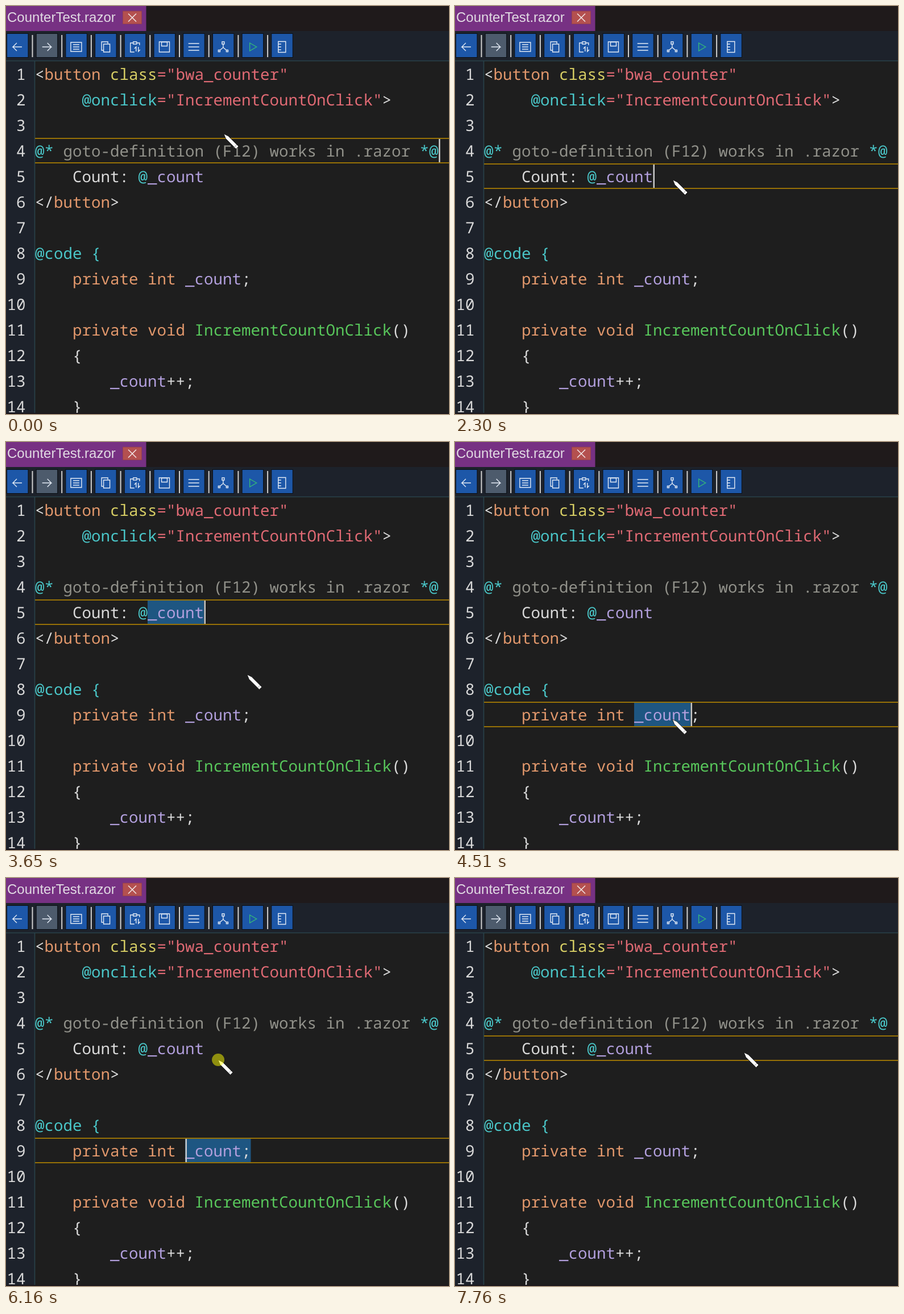
An HTML page for the animation above (8000 ms loop, 779x718 px).

```html
<!DOCTYPE html>
<html lang="en">
<head>
<meta charset="utf-8">
<title>Code editor</title>
<style>
  html, body { margin: 0; width: 100%; height: 100%; overflow: hidden; background: #1e1e1e; }
  svg { display: block; }
  .code { font: 27.5px "Noto Sans Mono", monospace; text-rendering: geometricPrecision; white-space: pre; }
  .tab { font: 24px "Liberation Sans", Arial, sans-serif; fill: #e2dce4; }
  .icon { fill: none; stroke: #e4ebf5; stroke-width: 1.4; }
  .plain { fill: #dadada; }
  .tag { fill: #e2986c; }
  .attr { fill: #d6cd64; }
  .string { fill: #e06a74; }
  .razor { fill: #4ac6c8; }
  .comment { fill: #91918a; }
  .field { fill: #b29fdd; }
  .method { fill: #58c65b; }
</style>
</head>
<body>
<svg width="779" height="718" viewBox="0 0 779 718">
  <rect width="779" height="718" fill="#1e1e1e"/>
  <rect width="779" height="44" fill="#1f1a1b"/>
  <rect width="246.500" height="44" fill="#773183"/>
  <text class="tab" x="2" y="28">CounterTest.razor</text>
  <rect x="205.500" y="9" width="33" height="22.500" fill="#b4504f" stroke="#93404f"/>
  <path d="M215 13.500l14 14m0-14l-14 14" stroke="#f0dfe0" stroke-width="1.700"/>
  <rect y="44" width="779" height="52" fill="#1d222b"/>
  <g id="toolbar"></g>
  <rect y="97" width="50" height="621" fill="#1d222b"/>
  <path d="M0 96.500H779M50.500 97V718" stroke="#28424a" stroke-width="1.600"/>
  <rect id="selection" height="41" fill="#1e5682"/>
  <path id="row" fill="none" stroke="#977106" stroke-width="1.800"/>
  <g id="code" class="code"></g>
  <rect y="716" width="779" height="2" fill="#1c171b"/>
  <rect id="caret" width="2.500" height="41" fill="#c9c9c9"/>
  <g id="pointer">
    <path d="M0 0L3.500 8.500L21.500 26.500L26 22L8 4Z" fill="#fff" stroke="#111" stroke-width=".8"/>
    <path d="M18.500 23.500L23 19" stroke="#777" stroke-width=".8"/>
    <circle id="press" r="11" fill="#ff0" fill-opacity=".5"/>
  </g>
</svg>
<script>
const LOOP = 8000, LEFT = 51, CHAR = 16.5, ROW = 45;
const $ = id => document.getElementById(id);
const columnX = col => LEFT + CHAR * col;
const rowY = line => 97 + ROW * (line - 1);

function set(el, attrs) {
  for (const name in attrs) el.setAttribute(name, attrs[name]);
}
function add(parent, tag, attrs, text = "") {
  const el = document.createElementNS("http://www.w3.org/2000/svg", tag);
  set(el, attrs);
  el.textContent = text;
  parent.append(el);
}

// Icon parts, placed by their centre
const box = (w, h, x = 0, y = 0) => `M${x - w / 2} ${y - h / 2}h${w}v${h}h${-w}Z`;
const rule = (w, x, y) => `M${x - w / 2} ${y}h${w}`;
const arrow = side => `M${-8 * side} 0h${16 * side}l${-7 * side} -7m0 14l${7 * side} -7`;
const rules = (w, x, gap) => [-gap, 0, gap].map(y => rule(w, x, y)).join("");
const icons = [
  arrow(-1),
  arrow(1),
  box(19, 16) + rules(11, 0, 4),
  box(11, 14, 2, 2) + "M-4 6h-3v-15h11v3",
  "M-3 -7h-5v16h7M3 -7h5v4" + box(6, 4, 0, -7) + "M2 8v-8l-3 3M6 0v8l3 -3",
  box(18, 18) + box(10, 7, 0, -5),
  rules(19, 0, 6),
  box(4, 4, 0, -7) + "M0 -5v6l-6 5M0 1l6 5" + box(3, 3, -7, 7) + box(3, 3, 7, 7),
  "M-5 -7l12 7l-12 7Z",
  box(13, 19) + rules(5, -4, 5)
];
icons.forEach((d, i) => {
  const x = 20 + 51.7 * i, bar = $("toolbar"), play = i === 8, disabled = i === 1;
  add(bar, "rect", { x: x - 18.5, y: 48.5, width: 37.5, height: 42, fill: disabled ? "#4d5b6c" : "#1d57a8", stroke: "#0b0f15" });
  add(bar, "path", { class: "icon", d, transform: `translate(${x} 72)`, style: play ? "stroke:#35b779" : "" });
  if (i < icons.length - 1) add(bar, "rect", { x: x + 25.5, y: 51, width: 2, height: 39, fill: "#cfcfcf" });
});

const source = `<button class="bwa_counter"
     @onclick="IncrementCountOnClick">

@* goto-definition (F12) works in .razor *@
    Count: @_count
</button>

@code {
    private int _count;

    private void IncrementCountOnClick()
    {
        _count++;
    }`;
const syntax = new RegExp([
  '(?<string>="[^"]*")',
  "(?<comment>(?<=@\\* ).*(?= \\*@))",
  "(?<razor>@\\*|\\*@|@code \\{|@onclick|@)",
  "(?<attr>class)",
  "(?<tag>button|private|int\\b|void)",
  "(?<method>\\w+(?=\\(\\)))",
  "(?<field>_count)",
  "(?<plain>Count:|\\S)"
].join("|"), "g");

source.split("\n").forEach((line, i) => {
  const y = rowY(i + 1) + 33, code = $("code");
  add(code, "text", { class: "plain", x: 34.5, y, "text-anchor": "end" }, i + 1);
  for (const { 0: text, index, groups } of line.matchAll(syntax)) {
    const kind = Object.keys(groups).find(name => groups[name]);
    add(code, "text", { class: kind, x: columnX(index), y }, text);
  }
});

// Editing steps; a selection runs between the anchor and the caret
const steps = [
  { at: 0, line: 4, caret: 43 },
  { at: 790, line: 5, caret: 18 },
  { at: 3120, line: 5, caret: 18, anchor: 12, click: true },
  { at: 3920, line: 9, caret: 16 },
  { at: 4450, line: 9, caret: 22, anchor: 16, click: true },
  { at: 4800, line: 9, caret: 23, click: true },
  { at: 5540, line: 9, caret: 16, anchor: 23 },
  { at: 6230, line: 5, caret: 18 }
];
const between = (t, from, to) => t >= from && t < to;
const isPressed = t => between(t, 5050, 6400) ||
  steps.some(s => s.click && between(t, s.at - 70, s.at));
const caretHidden = t => between(t, 1470, 2150) || t >= 7760;

// Pointer key points: time, x, y
const path = [
  [0, 383, 225], [1470, 378, 225], [2000, 402, 274], [2300, 383, 306], [2580, 383, 306],
  [2850, 297, 308], [3440, 297, 306], [3650, 424, 409], [4180, 390, 477], [4510, 382, 488],
  [4800, 434, 489], [5050, 434, 488], [5340, 344, 482], [5540, 318, 487], [5900, 320, 485],
  [6160, 373, 320], [6580, 392, 320], [7100, 508, 307], [LOOP, 508, 307]
];
function pointerAt(t) {
  const next = path.findIndex(p => p[0] > t);
  const [t0, x0, y0] = path[next - 1], [t1, x1, y1] = path[next];
  const k = (t - t0) / (t1 - t0);
  return [x0 + (x1 - x0) * k, y0 + (y1 - y0) * k];
}

function draw(t) {
  const { line, caret, anchor = caret } = steps.findLast(s => s.at <= t);
  const y = rowY(line);
  set($("row"), { d: `M${LEFT} ${y + 1}H779M${LEFT} ${y + 44}H779` });
  set($("selection"), { x: columnX(Math.min(anchor, caret)), y: y + 2, width: CHAR * Math.abs(anchor - caret) });
  set($("caret"), { x: columnX(caret) + 0.5, y: y + 2, opacity: caretHidden(t) ? 0 : 1 });
  set($("pointer"), { transform: `translate(${pointerAt(t)})` });
  set($("press"), { opacity: isPressed(t) ? 1 : 0 });
}

const start = performance.now();
function frame() {
  draw((performance.now() - start) % LOOP);
  requestAnimationFrame(frame);
}
frame();
</script>
</body>
</html>
```
